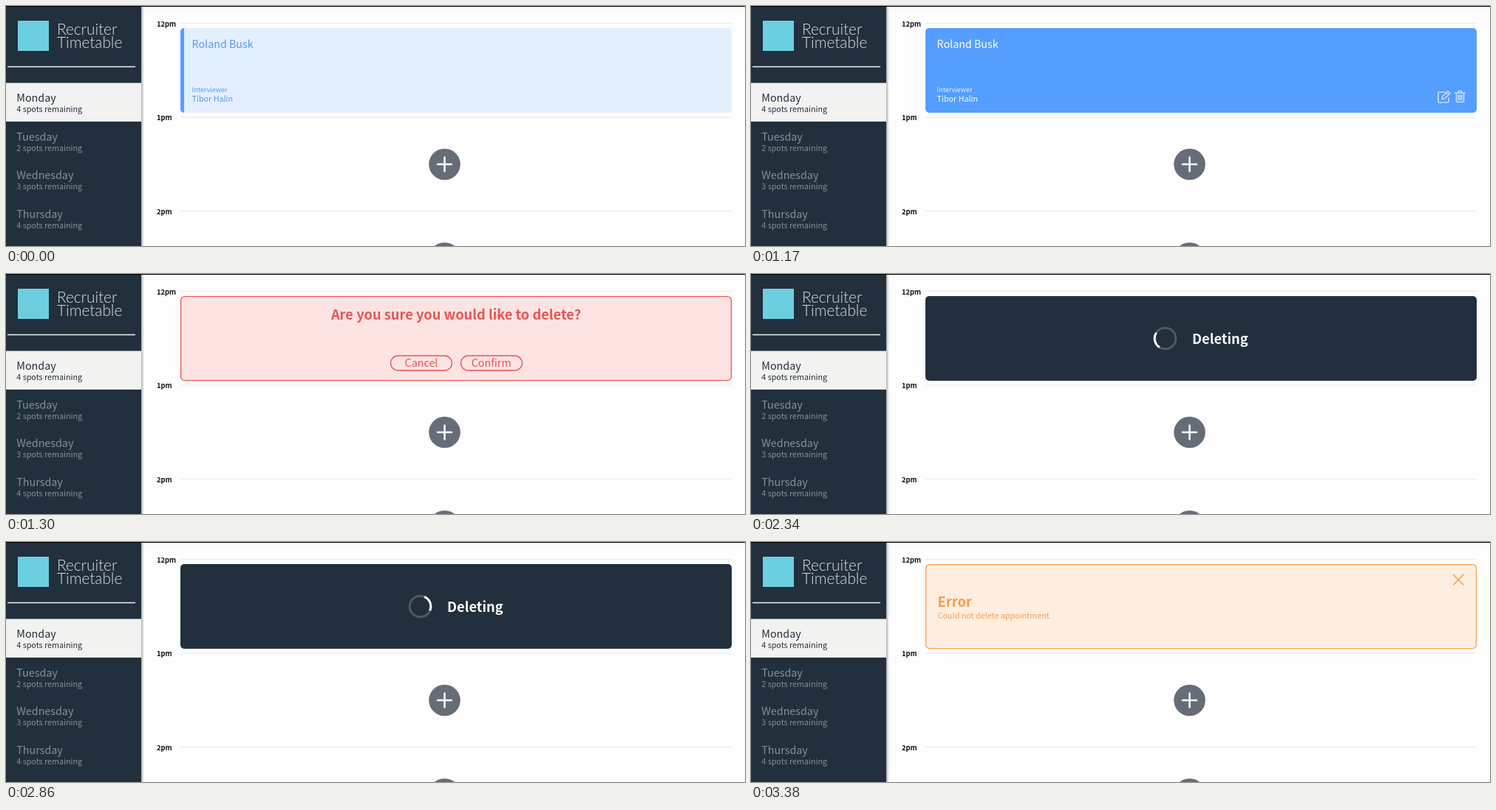
Animation of 1000 by 326 pixels, one loop 4940 ms. Source, as an HTML page:

```html
<!DOCTYPE html>
<html lang="en">
<head>
<meta charset="utf-8">
<title>Appointment planner</title>
<style>
  html, body { margin: 0; width: 100%; height: 100%; overflow: hidden; background: #fdfdfd; }
  svg { display: block; width: 100%; height: 100%; }
  text { font-family: "Noto Sans CJK JP", "Noto Sans CJK SC", "Noto Sans", sans-serif; font-size: 14.3px; white-space: pre; }
  .brand { font-family: Lato, "Open Sans", sans-serif; font-weight: 300; font-size: 20.8px; fill: #dfe2e4; }
  .small { font-size: 10.75px; }
  .light { font-weight: 300; }
  .tiny { font-size: 9px; font-weight: 300; }
  .hour { font-size: 9.4px; font-weight: 700; fill: #111; }
  .title { font-size: 18.3px; font-weight: 700; }
  .mid { text-anchor: middle; }
  .line { fill: none; stroke-linecap: round; stroke-linejoin: round; }
</style>
</head>
<body>
<svg viewBox="0 0 1000 326">
  <defs>
    <linearGradient id="shade">
      <stop offset="0" stop-color="#000" stop-opacity=".3"/>
      <stop offset="1" stop-color="#000" stop-opacity="0"/>
    </linearGradient>
  </defs>

  <rect width="1000" height="326" fill="#fdfdfd"/>
  <g id="hours"></g>

  <g id="booked">
    <rect x="236" y="30" width="746" height="115" rx="5" fill="#e3effd"/>
    <path d="M241 30v115a5 5 0 0 1-5-5V35a5 5 0 0 1 5-5z" fill="#549eff"/>
    <g fill="#549bf0">
      <text x="251.500" y="57">Roland Busk</text>
      <text x="251.500" y="117" class="tiny">Interviewer</text>
      <text x="251.500" y="130" class="small" font-weight="500">Tibor Halin</text>
    </g>
  </g>

  <g id="hover">
    <rect x="236" y="30" width="746" height="115" rx="5" fill="#549eff"/>
    <g fill="#fff">
      <text x="251.500" y="57">Roland Busk</text>
      <text x="251.500" y="117" class="tiny" opacity=".9">Interviewer</text>
      <text x="251.500" y="130" class="small">Tibor Halin</text>
    </g>
    <g class="line" stroke="#c9dffd" stroke-width="1.6">
      <path d="M939 117h-7.500q-1.500 0-1.500 1.500v11q0 1.500 1.500 1.500h11q1.500 0 1.500-1.500V125"/>
      <path d="M935.500 123l7.500-7.500 3 3-7.500 7.500-3.500.5zM941 117.500l3 3"/>
      <path d="M953 118h13M956.500 118l1-2.500h4l1 2.500M954.500 118v11q0 1.500 1.500 1.500h7q1.500 0 1.500-1.500v-11M957.300 121v6.500M959.500 121v6.500M961.700 121v6.500"/>
    </g>
  </g>

  <g id="ask">
    <rect x="236.600" y="30.600" width="744.800" height="114" rx="5" fill="#fde4e3" stroke="#ee5655" stroke-width="1.3"/>
    <text x="609" y="62" class="title mid" fill="#ea5350">Are you sure you would like to delete?</text>
    <g stroke="#ee5352" stroke-width="1.4">
      <rect x="520.500" y="111" width="83" height="20" rx="10" fill="none"/>
      <rect id="pill" x="615.500" y="111" width="83" height="20" rx="10" fill="none"/>
    </g>
    <text x="562" y="126" class="mid" fill="#ea5350">Cancel</text>
    <text id="yes" x="656.700" y="126" class="mid">Confirm</text>
  </g>

  <g id="busy">
    <rect x="236" y="30" width="746" height="115" rx="5" fill="#222f3c"/>
    <g fill="none" stroke="#fff" stroke-width="3">
      <circle cx="560.500" cy="87.500" r="14.300" opacity=".2"/>
      <path id="arc" d="M570.610 77.390a14.300 14.300 0 0 1 0 20.220"/>
    </g>
    <text x="597" y="94.500" class="title" fill="#fff">Deleting</text>
  </g>

  <g id="fail">
    <rect x="236.600" y="30.600" width="744.800" height="114" rx="5" fill="#fdeee1" stroke="#fa9f49" stroke-width="1.3"/>
    <path class="line" d="M950.500 44.500l13.500 13.500m0-13.500l-13.500 13.500" stroke="#fa9f49" stroke-width="1.7"/>
    <g fill="#fa9c45">
      <text x="252.500" y="88.300" class="title">Error</text>
      <text x="252.700" y="104" class="small light">Could not delete appointment</text>
    </g>
  </g>

  <rect x="183" width="4" height="326" fill="url(#shade)"/>
  <rect width="183" height="326" fill="#222f3c"/>
  <rect x="16" y="20" width="42" height="41" fill="#6ccfe0"/>
  <text x="69" y="38.500" class="brand">Recruiter</text>
  <text x="69" y="57" class="brand">Timetable</text>
  <path d="M2 82.500h173" stroke="#f4f4f4" stroke-width="1.6"/>
  <rect y="104.500" width="183" height="52.500" fill="#f2f2f0"/>
  <g id="days"></g>
  <rect width="1000" height="1" fill="#000"/>
</svg>

<script>
const LOOP = 4940, STEP = 130, SPIN = 1100;
const $ = id => document.getElementById(id);

const days = [["Monday", 4], ["Tuesday", 2], ["Wednesday", 3], ["Thursday", 4]];
$("days").innerHTML = days.map(([name, spots], i) => {
  const y = 130 + i * 52.6;
  return `<g fill="${i ? "#84919d" : "#222f3c"}">
    <text x="14.3" y="${y}">${name}</text>
    <text x="14.3" y="${y + 14}" class="small light">${spots} spots remaining</text></g>`;
}).join("");

const plus = y => `<circle cx="593.5" cy="${y}" r="21.3" fill="#666d78"/>
  <path class="line" d="M584 ${y}h19m-9.5-9.5v19" stroke="#fff" stroke-width="2.5"/>`;
$("hours").innerHTML = ["12pm", "1pm", "2pm"].map((label, i) => {
  const y = 23.5 + i * 127.5;
  return `<path d="M236 ${y}h746" stroke="#e8e8e8"/>
    <text x="204" y="${y + 4}" class="hour">${label}</text>${i ? plus(y + 64) : ""}`;
}).join("");

const scenes = [["booked", 0], ["hover", 650], ["ask", 1300], ["busy", 2340], ["fail", 3380]];

function draw(t) {
  scenes.forEach(([id, from], i) => {
    const to = i + 1 < scenes.length ? scenes[i + 1][1] : LOOP;
    $(id).style.display = t >= from && t < to ? "" : "none";
  });

  const over = t >= 1950;
  $("pill").setAttribute("fill", over ? "#ee5352" : "none");
  $("yes").setAttribute("fill", over ? "#fff" : "#ea5350");

  // The spinner advances in discrete ticks.
  const ticks = Math.floor((t - 2340) / STEP);
  const turn = 168 + ticks * STEP / SPIN * 360;
  $("arc").setAttribute("transform", `rotate(${turn} 560.5 87.5)`);
}

const start = performance.now();
function tick() {
  draw((performance.now() - start) % LOOP);
  requestAnimationFrame(tick);
}
tick();
</script>
</body>
</html>
```
